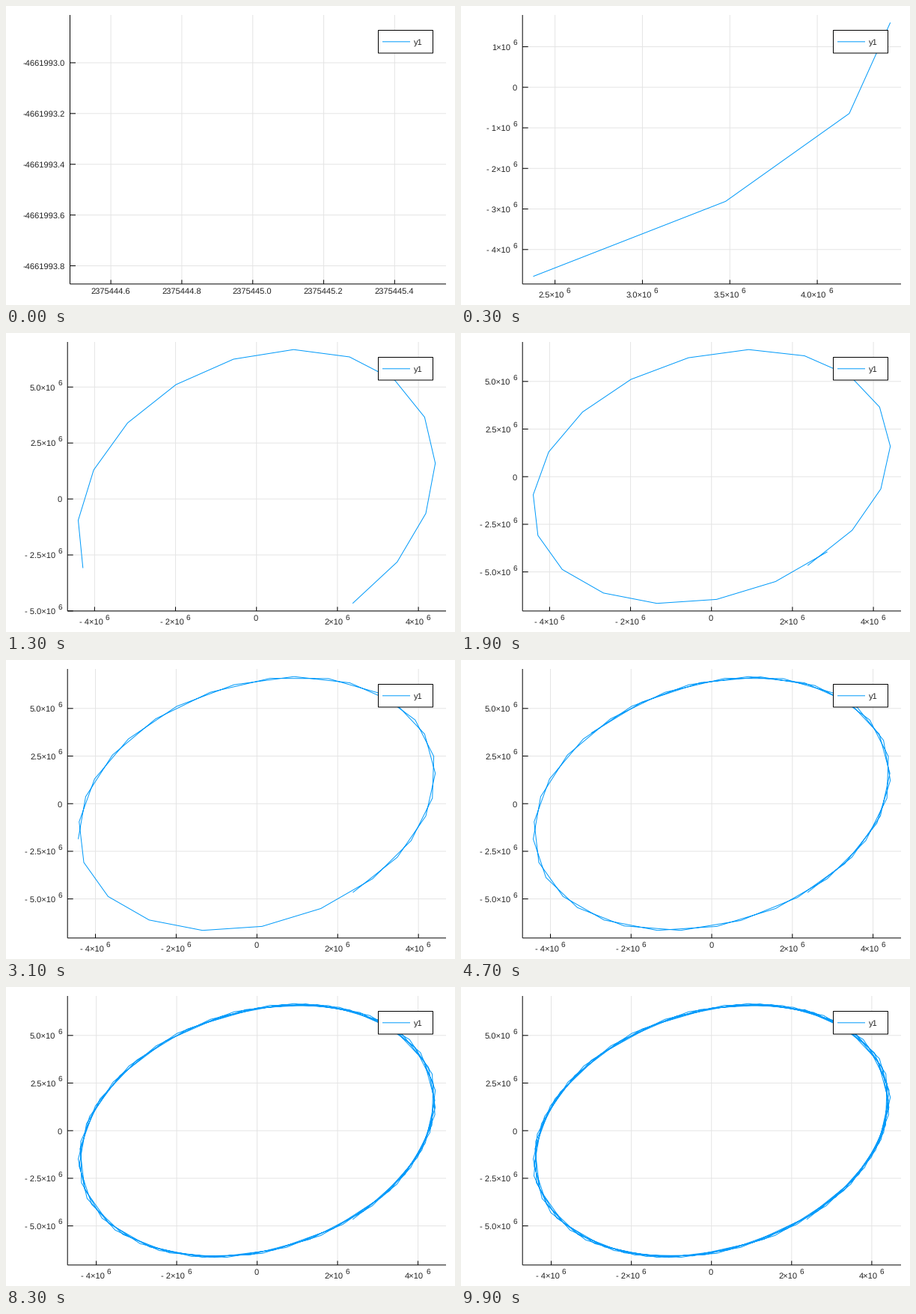
A matplotlib script for the animation above (10 s loop, 600 px wide and 400 px high).

```python
import numpy as np
import matplotlib.pyplot as plt
from matplotlib.animation import FuncAnimation
from matplotlib.patches import Rectangle

W, H, DPI = 600, 400, 100
PX = 72 / DPI
FRAMES = 100
BLUE, INK = "#009AFA", "#222222"
RIGHT, TOP, BOTTOM = 588, 12, 371.9

plt.rcParams["font.family"] = "Liberation Sans"
plt.rcParams["font.size"] = 11.1 * PX
plt.rcParams["text.hinting"] = "none"


def orbit():
    """Circular inclined orbit with a slowly drifting node, seen along z."""
    x0, y0 = 2375445.0148, -4661993.3417
    tilt = np.cos(np.radians(51.64))
    k = np.arange(FRAMES)
    node = np.radians(75.9 - 0.01736 * k)
    c, s = np.cos(node), np.sin(node)
    a = x0 * c[0] + y0 * s[0]
    b = (y0 * c[0] - x0 * s[0]) / tilt
    u = np.arctan2(b, a) + np.radians(19.382) * k
    a, b = np.hypot(a, b) * np.array([np.cos(u), tilt * np.sin(u)])
    return a * c - b * s, a * s + b * c


def limits(v):
    lo, hi = v.min(), v.max()
    if hi == lo:
        lo, hi = lo - 0.5, hi + 0.5
    pad = 0.03 * (hi - lo)
    return lo - pad, hi + pad


def best_ticks(lo, hi):
    """Pick the 4 to 8 ticks with the best mix of count, zero, cover, step."""
    span = hi - lo
    best, found = -np.inf, None
    mag = int(np.floor(np.log10(span)))
    for z in (mag + 1, mag, mag - 1):
        for q, nice in ((1, 1), (5, 0.9), (2.5, 0.5), (2, 0.7), (3, 0.2)):
            step = q * 10.0 ** z
            i = np.arange(np.ceil(lo / step), np.floor(hi / step) + 1)
            n = len(i)
            if not 4 <= n <= 8:
                continue
            score = ((1 - abs(n - 5) / 5) / 4 + (0 in i) / 6
                     + 0.5 * span / ((n - 1) * step) + nice / 4)
            if score > best + 1e-9:
                best, found = score, (i * step, step)
    return found


def tick_labels(ticks, step):
    """Return (text, has_exponent) pairs."""
    if step < 1e3:
        return [(f"{t:.1f}", False) for t in ticks]
    unit = step / 1e6
    d = next(n for n in range(4) if abs(round(unit, n) - unit) < 1e-9)
    out = []
    for t in ticks:
        if abs(t) < step / 2:
            out.append(("0", False))
        else:
            sign = "- " if t < 0 else ""
            out.append((f"{sign}{abs(t) / 1e6:.{d}f}×10", True))
    return out


fig = plt.figure(figsize=(W / DPI, H / DPI), dpi=DPI, facecolor="white")
ax = fig.add_axes([0, 0, 1, 1])
xs, ys = orbit()


def stroke(x, y, color="black", z=2, **kw):
    ax.plot(x, y, color=color, lw=PX, zorder=z, snap=False,
            solid_capstyle="butt", **kw)


def label(x, y, text, power, ha):
    main = ax.text(x, y, text, ha=ha, color=INK, zorder=3)
    if power:
        ax.annotate("6", xy=(1, y - 5.4), xycoords=(main, "data"),
                    xytext=(2.8, 0), textcoords="offset pixels",
                    fontsize=10 * PX, color=INK, zorder=3)


def legend():
    ax.add_patch(Rectangle((497.5, 32.5), 73, 30.5, fc="white", ec="black",
                           lw=PX, zorder=5, snap=False))
    stroke([503, 540], [47.8, 47.8], BLUE, 6)
    ax.text(545, 52, "y1", color=INK, zorder=6)


def draw(k):
    ax.cla()
    ax.set(xlim=(0, W), ylim=(H, 0))
    ax.axis("off")

    x, y = xs[:k + 1], ys[:k + 1]
    left = 82.2 if k else 85.5
    (x0, x1), (y0, y1) = limits(x), limits(y)

    def to_x(v):
        return left + (v - x0) / (x1 - x0) * (RIGHT - left)

    def to_y(v):
        return BOTTOM - (v - y0) / (y1 - y0) * (BOTTOM - TOP)

    ticks, step = best_ticks(x0, x1)
    for t, (text, power) in zip(to_x(ticks), tick_labels(ticks, step)):
        stroke([t, t], [TOP, BOTTOM], "#e5e5e5", 1)
        stroke([t, t], [BOTTOM - 5.5, BOTTOM])
        label(t - 0.6 - 4.2 * power, 390 if power else 385, text, power,
              "center")

    ticks, step = best_ticks(y0, y1)
    for t, (text, power) in zip(to_y(ticks), tick_labels(ticks, step)):
        stroke([left, RIGHT], [t, t], "#e5e5e5", 1)
        stroke([left, left + 7.5], [t, t])
        label(left - 7 - 8.9 * power, t + 4.2, text, power, "right")

    stroke([left, left], [TOP, BOTTOM])
    stroke([left, RIGHT], [BOTTOM, BOTTOM])
    stroke(to_x(x), to_y(y), BLUE, 4, solid_joinstyle="miter")
    legend()
    return []


anim = FuncAnimation(fig, draw, frames=FRAMES, interval=100,
                     init_func=lambda: [], repeat=True, repeat_delay=0)
plt.show()
```
